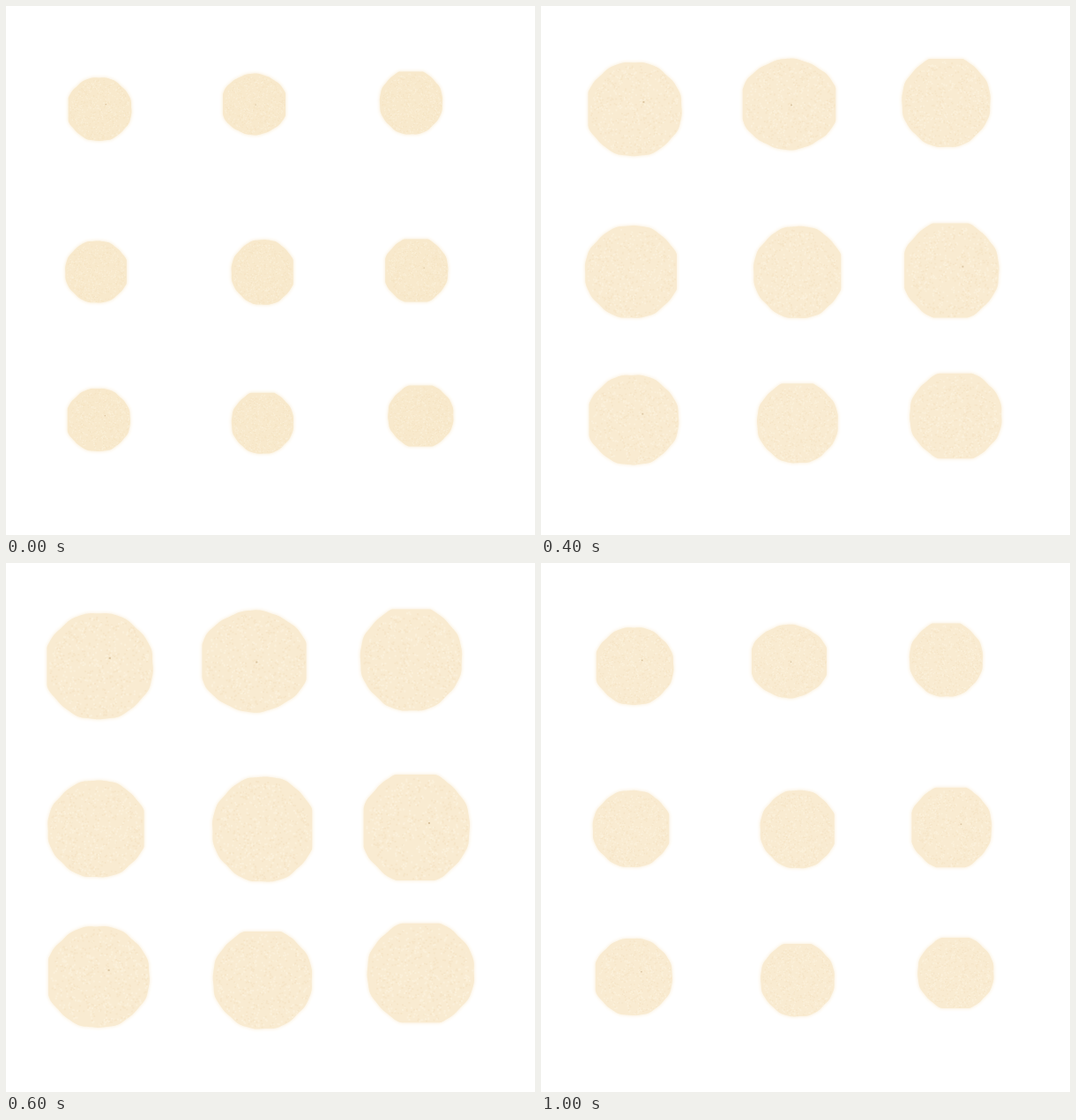
An HTML page with a canvas that plays this animation: 600x600 px, repeating every 1.2 s.

```html
<!DOCTYPE html>
<html lang="en">
<head>
<meta charset="utf-8">
<title>Pulsing paper dots</title>
<style>
html, body { margin: 0; width: 100%; height: 100%; overflow: hidden; background: #fff; }
canvas { display: block; }
</style>
</head>
<body>
<canvas id="stage" width="600" height="600"></canvas>
<script>
const ctx = document.getElementById('stage').getContext('2d');
const HOLD = 200;
const POSES = [0, 1, 2, 3, 2, 1];

// Centre, width in each pose, height / width, flattened sides, corners, speck
const dots = [
  { x: 106.5, y: 117, w: [71.5, 87.5, 106, 120], k: 1, flat: 'l', n: 8, speck: [.17, -.17] },
  { x: 281.5, y: 111.5, w: [71, 85, 105.5, 118], k: .965, flat: 'lr', n: 6, speck: [.03, 0] },
  { x: 459.5, y: 110, w: [71, 83, 100, 115], k: 1, flat: 't', n: 8 },
  { x: 102, y: 301.5, w: [69.5, 86.5, 104, 109], k: 1.005, flat: 'r', n: 8 },
  { x: 290.7, y: 302, w: [70, 84, 99, 113], k: 1.05, flat: 'r', n: 8 },
  { x: 465.7, y: 300, w: [71, 90.5, 107, 120], k: 1, flat: 'ltb', n: 8, speck: [.22, -.1] },
  { x: 105.3, y: 469.4, w: [71, 87, 101.5, 114.5], k: 1, flat: 'l', n: 8, speck: [.18, -.15] },
  { x: 291, y: 473.2, w: [70, 83.5, 91.5, 112], k: .985, flat: 't', n: 8 },
  { x: 470.4, y: 465, w: [74, 86, 104, 121], k: .93, flat: 'tb', n: 8 }
];

let seed = 7;
const random = () => (seed = seed * 16807 % 2147483647) / 2147483647;

// Outline in a box from -1 to 1: a slightly cornered disc cut at its flat sides
function outline({ flat, n }) {
  const has = side => flat.includes(side) ? 1 : 0;
  const cut = .05;
  const clamp = (v, low, high) =>
    Math.min(high ? 1 : 2, Math.max(low ? -1 : -2, v));
  const path = new Path2D();
  const phase = random() * 6;
  for (let i = 0; i < 180; i++) {
    const a = i * Math.PI / 90;
    const r = (1 - .01 * Math.cos(n * a)) / .99 + .005 * Math.sin(17 * a + phase);
    const x = r * Math.cos(a) * (1 + cut * (has('l') + has('r')) / 2) + cut * (has('r') - has('l')) / 2;
    const y = r * Math.sin(a) * (1 + cut * (has('t') + has('b')) / 2) + cut * (has('b') - has('t')) / 2;
    path.lineTo(clamp(x, has('l'), has('r')), clamp(y, has('t'), has('b')));
  }
  path.closePath();
  return path;
}

function grain(count) {
  const path = new Path2D();
  for (let i = 0; i < count; i++) {
    const a = random() * 2 * Math.PI, r = Math.sqrt(random()) * .96;
    path.rect(r * Math.cos(a), r * Math.sin(a), .035, .035);
  }
  return path;
}

for (const dot of dots) {
  dot.shape = outline(dot);
  dot.dark = grain(320);
  dot.light = grain(320);
}

function drawDot(dot, pose) {
  const r = dot.w[pose] / 2;
  const paper = pose ? '#f9ebd1' : '#f8e9cc';
  ctx.save();
  ctx.translate(dot.x, dot.y);
  ctx.scale(r, r * dot.k);
  ctx.shadowColor = paper;
  ctx.shadowBlur = 4;
  ctx.fillStyle = paper;
  ctx.fill(dot.shape);
  ctx.shadowColor = 'transparent';
  ctx.clip(dot.shape);
  ctx.fillStyle = 'rgba(226, 196, 150, .16)';
  ctx.fill(dot.dark);
  ctx.fillStyle = 'rgba(255, 250, 238, .3)';
  ctx.fill(dot.light);
  if (dot.speck) {
    ctx.fillStyle = 'rgba(190, 160, 115, .5)';
    ctx.fillRect(...dot.speck, .035, .035);
  }
  ctx.restore();
}

function frame() {
  const pose = POSES[Math.floor(performance.now() / HOLD) % POSES.length];
  ctx.clearRect(0, 0, 600, 600);
  for (const dot of dots) drawDot(dot, pose);
  requestAnimationFrame(frame);
}
frame();
</script>
</body>
</html>
```
